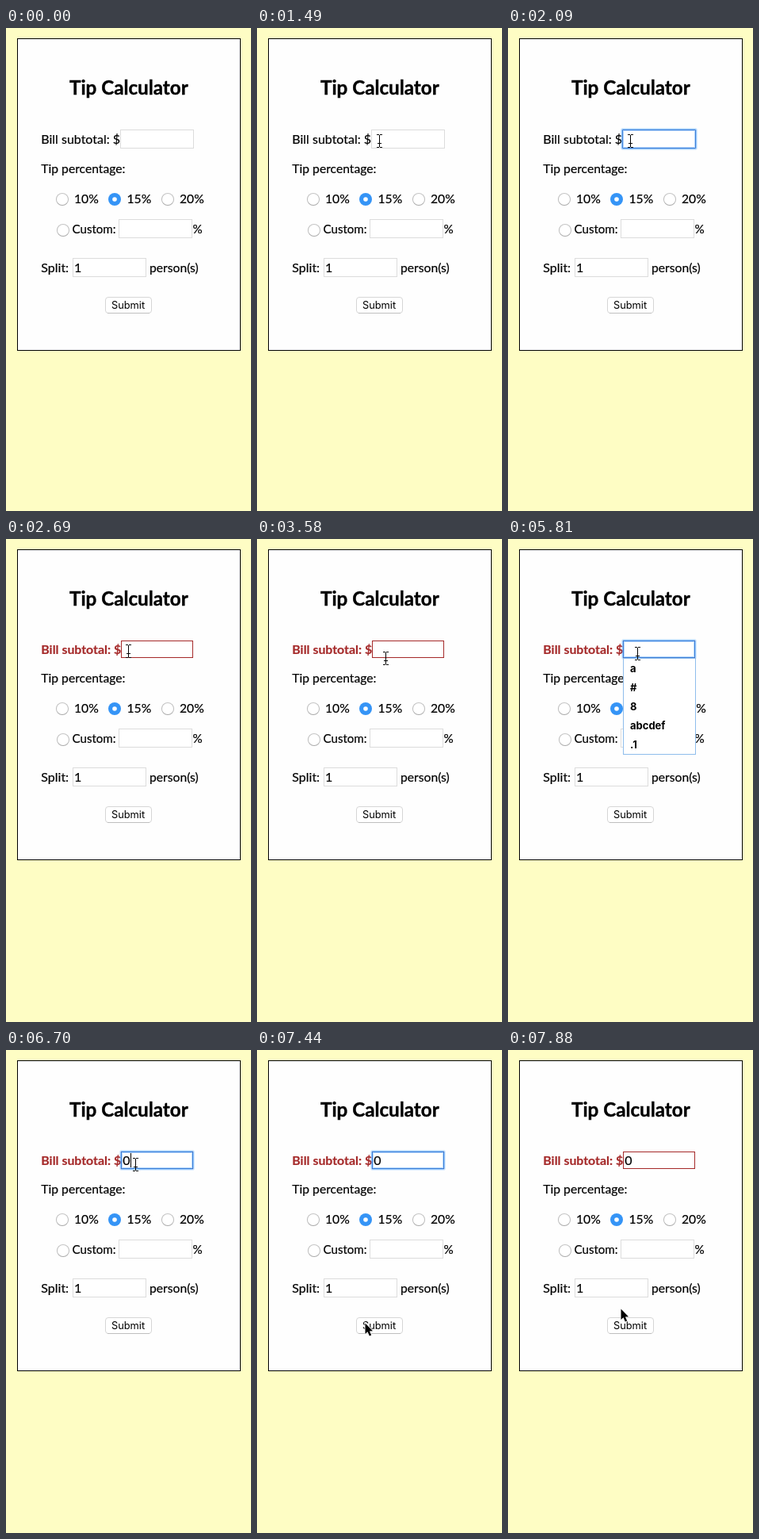
An HTML page with a canvas for the animation above (8000 ms loop, 309 by 609 pixels).

```html
<!DOCTYPE html>
<html lang="en">
<head>
<meta charset="utf-8">
<title>Tip Calculator</title>
<style>
html, body { margin: 0; width: 100%; height: 100%; overflow: hidden; background: #fefdc4; }
canvas { display: block; width: 309px; height: 609px; }
</style>
</head>
<body>
<canvas id="stage"></canvas>
<script>
const W = 309, H = 609, LOOP = 8000;
const FORM = "Lato, sans-serif", UI = "Inter, sans-serif";
const BROWN = "#a52a2a";
const canvas = document.getElementById("stage");
const ctx = canvas.getContext("2d");
const dpr = window.devicePixelRatio || 1;
canvas.width = W * dpr;
canvas.height = H * dpr;

// Pointer stops: time, shape, hotspot x, hotspot y
const pointer = [
  [0, "none", 0, 0],
  [600, "arrow", 194, 174], [750, "arrow", 181, 166],
  [900, "arrow", 170, 158], [1050, "beam", 165, 153],
  [1490, "beam", 154, 142],
  [2690, "beam", 154, 141],
  [3140, "beam", 157, 148], [3290, "arrow", 162, 162],
  [3430, "beam", 162, 156], [3580, "beam", 162, 150],
  [3730, "beam", 163, 147], [3880, "beam", 163, 145],
  [4320, "beam", 163, 144],
  [7150, "arrow", 151, 225], [7300, "arrow", 138, 352],
  [7440, "arrow", 136, 344], [7730, "arrow", 137, 341],
  [7880, "arrow", 142, 326]
];

const within = (t, a, b) => t >= a && t < b;

function stateAt(t) {
  return {
    error: t >= 2690,
    focus: within(t, 1640, 2690) || within(t, 4920, 7590),
    caret: within(t, 1640, 2090) || within(t, 4920, 5370) ||
      within(t, 5510, 5810) || within(t, 5960, 6400) || within(t, 6700, 7150),
    menu: within(t, 5510, 5960),
    bill: t >= 6400 ? "0" : "",
    pressed: within(t, 7590, 7730),
    pointer: pointer.filter(p => p[0] <= t).pop()
  };
}

function text(str, x, y, size = 15.7, weight = 400, color = "#000", family = FORM, bolder = 0.2) {
  ctx.font = `${weight} ${size}px ${family}`;
  ctx.fillStyle = ctx.strokeStyle = color;
  ctx.fillText(str, x, y);
  if (bolder) {
    ctx.lineWidth = bolder;
    ctx.strokeText(str, x, y);
  }
}

function box(x, y, w, h, stroke, fill = "#fff") {
  ctx.fillStyle = fill;
  ctx.fillRect(x, y, w, h);
  ctx.strokeStyle = stroke;
  ctx.lineWidth = 1;
  ctx.strokeRect(x + 0.5, y + 0.5, w - 1, h - 1);
}

function roundBox(x, y, w, h, r) {
  ctx.beginPath();
  ctx.roundRect(x, y, w, h, r);
}

function disc(x, y, r, fill) {
  ctx.beginPath();
  ctx.arc(x, y, r, 0, 2 * Math.PI);
  ctx.fillStyle = fill;
  ctx.fill();
}

function radio(x, y, checked) {
  if (checked) {
    disc(x, y, 8, "#3594f6");
    disc(x, y, 2.8, "#fff");
    return;
  }
  const edge = ctx.createLinearGradient(0, y - 8, 0, y + 8);
  edge.addColorStop(0, "#c6c6c6");
  edge.addColorStop(1, "#a8a8a8");
  disc(x, y, 8, edge);
  disc(x, y, 7.1, "#fff");
}

function button(y, pressed) {
  const face = ctx.createLinearGradient(0, y, 0, y + 20);
  face.addColorStop(0, pressed ? "#6bb3fa" : "#fff");
  face.addColorStop(1, pressed ? "#087eff" : "#fff");
  roundBox(125.5, y + 0.5, 58, 20, 3.5);
  ctx.fillStyle = face;
  ctx.fill();
  ctx.strokeStyle = pressed ? "#3a8df0" : "#d6d6d6";
  ctx.lineWidth = 1;
  ctx.stroke();
  ctx.fillStyle = pressed ? "#1a63c4" : "#b9b9b9";
  ctx.fillRect(128, y + 20, 53, 0.8);
  text("Submit", 133, y + 15, 12.8, 400, pressed ? "#fff" : "#000", UI, 0);
}

function billField(s) {
  const x = s.error ? 145 : 144, w = s.error ? 91 : 93, h = s.error ? 22 : 24;
  box(x, 128, w, h, s.error ? BROWN : "#dcdcdc");
  if (s.focus) {
    const rings = [[2, "#3b99fc30"], [1, "#3b99fc80"], [0, "#3f7fd6"], [-1, "#3b99fc60"]];
    ctx.lineWidth = 1;
    for (const [out, color] of rings) {
      roundBox(x + 0.5 - out, 128.5 - out, w - 1 + 2 * out, h - 1 + 2 * out, Math.max(out, 0));
      ctx.strokeStyle = color;
      ctx.stroke();
    }
  }
  text(s.bill, 147.3, 145, 16);
  if (s.caret) {
    ctx.fillStyle = "#000";
    ctx.fillRect(s.bill ? 157 : 147, s.error ? 130 : 131, 1, 18);
  }
}

function menu() {
  box(145, 150, 92, 122, "#8fbdec");
  ["a", "#", "8", "abcdef", ".1"].forEach((item, i) =>
    text(item, 154, 168 + 24 * i, 13, 700, "#000", UI, 0));
}

function arrow(x, y) {
  ctx.save();
  ctx.translate(x, y);
  ctx.beginPath();
  [[0.5, 0.5], [0.5, 14], [3.5, 11.2], [5.8, 16.6], [8.2, 15.6], [5.9, 10.4], [10, 10.2]]
    .forEach(p => ctx.lineTo(...p));
  ctx.closePath();
  ctx.strokeStyle = "#fff";
  ctx.lineWidth = 1.8;
  ctx.stroke();
  ctx.fillStyle = "#000";
  ctx.fill();
  ctx.restore();
}

function beam(x, y) {
  ctx.fillStyle = "#000";
  const bar = (dx, dy, w, h) => ctx.fillRect(x + dx, y + dy, w, h);
  bar(0, -7, 1, 15);
  for (const dy of [-8, 8]) {
    bar(-3, dy, 3, 1);
    bar(1, dy, 3, 1);
  }
  bar(-2, 3, 5, 1);
}

function draw(t) {
  const s = stateAt(t), up = s.error ? 2 : 0;
  ctx.setTransform(dpr, 0, 0, dpr, 0, 0);
  ctx.fillStyle = "#fefdc4";
  ctx.fillRect(0, 0, W, H);
  box(14, 13, 282, 394 - up, "#000", "#fefefe");
  text("Tip Calculator", 80, 84, 24.2, 700, "#000", FORM, 0.4);

  if (s.error) text("Bill subtotal: $", 44.3, 145, 15.9, 700, BROWN);
  else text("Bill subtotal: $", 44.3, 146, 16);
  billField(s);

  ctx.save();
  ctx.translate(0, -up);
  text("Tip percentage:", 44.3, 183);
  radio(71, 216);
  text("10%", 86, 221);
  radio(137, 216, true);
  text("15%", 152.5, 221);
  radio(204, 216);
  text("20%", 219, 221);
  radio(72, 255);
  text("Custom:", 83.5, 259, 15.1);
  box(142, 241, 93, 24, "#dcdcdc");
  text("%", 235.5, 259, 15.2);
  text("Split:", 44.3, 308, 16);
  box(84, 290, 93, 24, "#dcdcdc");
  text("1", 86, 308, 16);
  text("person(s)", 181, 308);
  button(339, s.pressed);
  ctx.restore();

  if (s.menu) menu();
  const [, shape, x, y] = s.pointer;
  if (shape === "arrow") arrow(x, y);
  if (shape === "beam") beam(x, y);
}

const start = performance.now();
function tick() {
  draw((performance.now() - start) % LOOP);
  requestAnimationFrame(tick);
}
tick();
</script>
</body>
</html>
```
